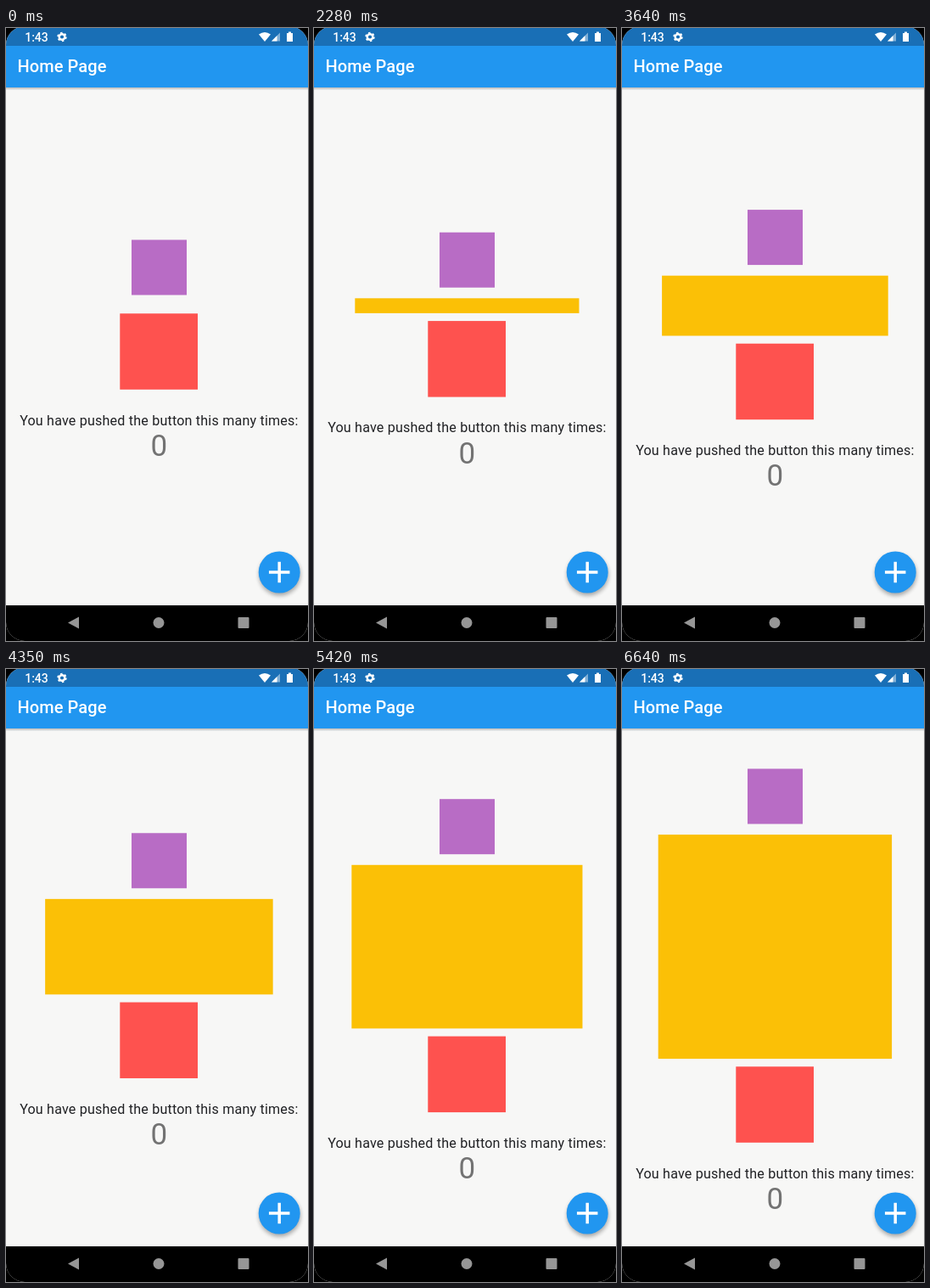
These frames come from a looping animation (356 by 722 pixels, 6.85 s). An HTML page:

```html
<!DOCTYPE html>
<html lang="en">
<head>
<meta charset="utf-8">
<title>Home Page</title>
<style>
html, body { margin: 0; width: 100%; height: 100%; overflow: hidden; background: #000; }
svg { display: block; width: 356px; height: 722px; font-family: Roboto, sans-serif; }
.title { font-size: 20px; font-weight: 500; letter-spacing: .06px; }
.clock { font-size: 14px; font-weight: 500; }
.label { font-size: 16.1px; letter-spacing: .19px; }
.count { font-size: 35px; }
</style>
</head>
<body>
<svg viewBox="0 0 356 722">
  <defs>
    <clipPath id="screen"><rect y="-2" width="356" height="724" rx="22"/></clipPath>
    <filter id="blur" x="-30%" y="-30%" width="160%" height="160%"><feGaussianBlur stdDeviation="2.5"/></filter>
    <linearGradient id="shade" x2="0" y2="1">
      <stop stop-color="#000" stop-opacity=".25"/>
      <stop offset="1" stop-color="#000" stop-opacity="0"/>
    </linearGradient>
  </defs>
  <g clip-path="url(#screen)">
    <rect width="356" height="722" fill="#f7f7f6"/>
    <rect y="70" width="356" height="3.500" fill="url(#shade)"/>
    <rect y="20" width="356" height="50" fill="#2196f0"/>
    <rect width="356" height="21" fill="#196fb6"/>

    <g fill="#fff">
      <text class="clock" x="22.2" y="15.500">1:43</text>
      <text class="title" x="13.600" y="52">Home Page</text>
      <g transform="translate(66 10.5)">
        <circle r="3.300" fill="none" stroke="#fff" stroke-width="2.400"/>
        <circle r="4.800" fill="none" stroke="#fff" stroke-width="1.800" stroke-dasharray="2.4 2.627"/>
      </g>
      <path d="M298 7.500Q305 2.500 312 7.500L305 16Z"/>
      <path d="M323 5.500V15.500H313Z" opacity=".45"/>
      <path d="M319.500 9V15.500H313Z"/>
      <path d="M331 6h2v-1.500h3V6h2v10h-7Z"/>
    </g>

    <g id="upper"><rect x="148" y="249.500" width="65" height="65" fill="#b86cc5"/></g>
    <rect id="panel" fill="#fbc006"/>
    <g id="lower" text-anchor="middle">
      <rect x="134.300" y="336.300" width="91.700" height="89.500" fill="#fe524f"/>
      <text class="label" x="180.400" y="467.500" fill="#202124">You have pushed the button this many times:</text>
      <text class="count" x="180.300" y="504" fill="#737373">0</text>
    </g>

    <g transform="translate(322.2 641)">
      <circle cx=".5" cy="3" r="24.500" opacity=".32" filter="url(#blur)"/>
      <circle r="24.500" fill="#2196f0"/>
      <path d="M-12.250 0h24.500M0 -12.250v24.500" stroke="#fff" stroke-width="3.500"/>
    </g>

    <rect y="680" width="356" height="42"/>
    <g fill="#969696">
      <path d="M73 700.500L86 693.500V707.500Z"/>
      <circle cx="180" cy="700.500" r="6.500"/>
      <rect x="273.500" y="694" width="13" height="13" rx="1"/>
    </g>
  </g>
</svg>
<script>
const LOOP = 6850, FPS = 14;
// Panel growth as [ms, height]
const keys = [[1050, 0], [1420, 1.5], [3000, 42], [4350, 112], [5000, 160], [5850, 224], [6420, 263], [6640, 264]];
const get = id => document.getElementById(id);
const upper = get('upper'), panel = get('panel'), lower = get('lower');

const gap = i => keys[i + 1][0] - keys[i][0];
const rate = i => (keys[i + 1][1] - keys[i][1]) / gap(i);
const slopes = keys.map((_, i) => i === 0 || i === keys.length - 1 ? 0 :
  (gap(i) * rate(i - 1) + gap(i - 1) * rate(i)) / (gap(i - 1) + gap(i)));

// Cubic Hermite curve through the keys
function heightAt(t) {
  if (t <= keys[0][0]) return 0;
  const i = keys.findIndex(k => k[0] >= t) - 1;
  if (i < 0) return keys[keys.length - 1][1];
  const d = gap(i), s = (t - keys[i][0]) / d, s2 = s * s, s3 = s2 * s;
  return (2 * s3 - 3 * s2 + 1) * keys[i][1] + (3 * s2 - 2 * s3) * keys[i + 1][1]
    + d * ((s3 - 2 * s2 + s) * slopes[i] + (s3 - s2) * slopes[i + 1]);
}

function draw(t) {
  const h = heightAt(t), w = 263.4 + h * .0455;
  upper.setAttribute('transform', `translate(0 ${-h / 2})`);
  lower.setAttribute('transform', `translate(0 ${h / 2})`);
  const box = { x: 180.4 - w / 2, y: 327.1 - h / 2, width: w, height: h };
  for (const k in box) panel.setAttribute(k, box[k]);
}

function tick() {
  const t = performance.now() % LOOP;
  draw(Math.floor((t + 9) * FPS / 1000) * 1000 / FPS);
  requestAnimationFrame(tick);
}
tick();
</script>
</body>
</html>
```
